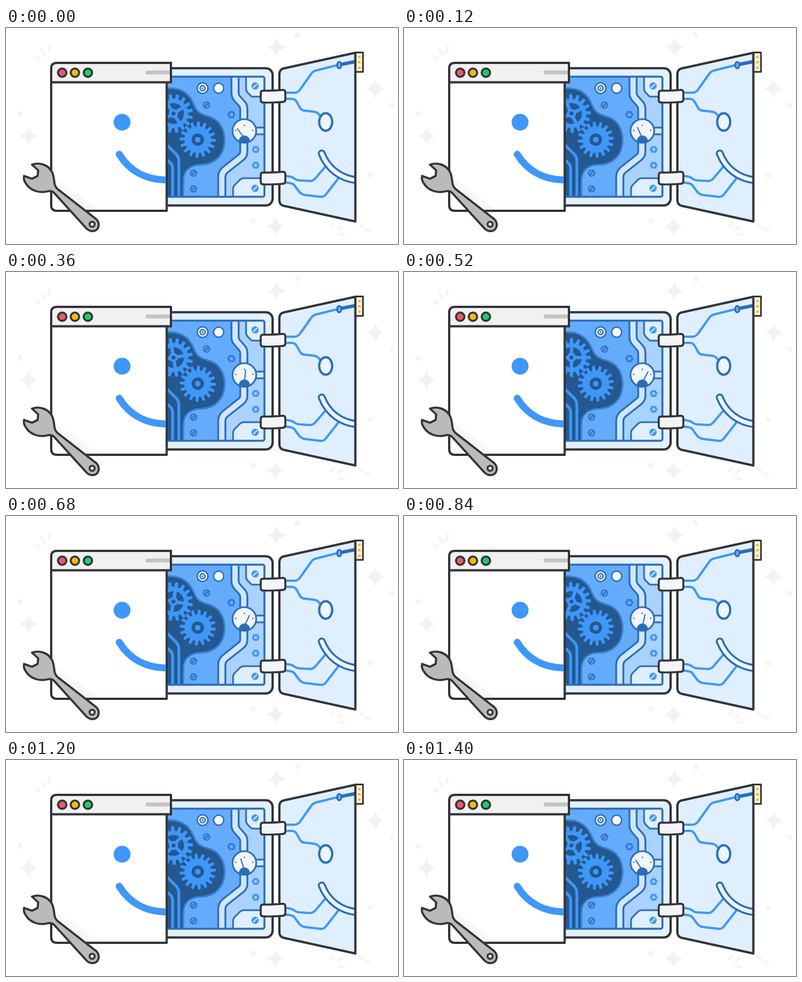
Write an HTML page with a canvas that moves like this. It is 694 by 384 pixels and loops after 1.44 s.

```html
<!DOCTYPE html>
<html lang="en">
<head>
<meta charset="utf-8">
<style>
  html, body { margin: 0; width: 100%; height: 100%; overflow: hidden; background: #fff; }
  canvas { display: block; width: 694px; height: 384px; }
</style>
</head>
<body>
<canvas id="stage" width="694" height="384"></canvas>
<script>
const ctx = document.getElementById('stage').getContext('2d');
const LOOP = 1440;
const INK = '#323438', BLUE = '#3f97f8', LINE = '#2c6dba', DEEP = '#245890';
const PANEL = '#65abfc', PALE = '#a9d2ff', PIPE = '#d0e6ff', ICE = '#dfefff', FAINT = '#f5f5f5';
const TAU = Math.PI * 2;

function paint(path, fill, stroke, width = 4) {
  if (fill) { ctx.fillStyle = fill; ctx.fill(path); }
  if (stroke) {
    ctx.strokeStyle = stroke;
    ctx.lineWidth = width;
    ctx.stroke(path);
  }
}
const draw = (d, fill, stroke, width) => paint(new Path2D(d), fill, stroke, width);

function oval(x, y, rx, ry, fill, stroke, width) {
  const p = new Path2D();
  p.ellipse(x, y, rx, ry, 0, 0, TAU);
  paint(p, fill, stroke, width);
}
const disc = (x, y, r, fill, stroke, width) => oval(x, y, r, r, fill, stroke, width);

function box(x, y, w, h, r, fill, stroke, width) {
  const p = new Path2D();
  p.roundRect(x, y, w, h, r);
  paint(p, fill, stroke, width);
}

function sparkle(x, y, r) {
  const k = r * 0.22;
  draw(`M${x} ${y - r}Q${x + k} ${y - k} ${x + r} ${y}Q${x + k} ${y + k} ${x} ${y + r}` +
       `Q${x - k} ${y + k} ${x - r} ${y}Q${x - k} ${y - k} ${x} ${y - r}Z`, '#f2f2f2');
}

function backdrop() {
  sparkle(479, 34, 16);
  sparkle(654, 108, 16);
  sparkle(40, 192, 16);
  sparkle(477, 353, 16);
  for (const [x, y] of [[516, 12], [25, 153], [683, 137], [645, 262], [437, 343]]) disc(x, y, 5, FAINT);
  draw('M53 52L60 56M63 38L68 46M77 32L76 41M588 44L584 52M600 53L592 57' +
       'M580 348L576 353M594 352L588 357M598 367L590 367M625 348L631 354M637 357L645 361', null, FAINT, 5);
}

function screw(x, y, fill, line, slot) {
  disc(x, y, 5.5, fill, line, 2);
  draw(`M${x - 3} ${y + 3}L${x + 3} ${y - 3}`, null, slot, 2);
}

function nut(x, y, fill, line, hole) {
  draw(`M${x - 6} ${y}l3 -5h6l3 5l-3 5h-6Z`, fill, line, 2);
  disc(x, y, 2.6, hole);
}

function gearBody(outer, root, teeth) {
  const p = new Path2D(), step = TAU / teeth;
  for (let i = 0; i < teeth; i++) {
    for (const [f, r] of [[-0.32, root], [-0.18, outer], [0.18, outer], [0.32, root]]) {
      const a = (i + f) * step;
      p.lineTo(r * Math.cos(a), r * Math.sin(a));
    }
  }
  p.closePath();
  return p;
}
const bigGear = gearBody(34.5, 26, 16);
const smallGear = gearBody(32, 23.5, 16);

function gears(turn) {
  ctx.save();
  ctx.translate(296.5, 152);
  ctx.rotate(turn);
  paint(bigGear, BLUE);
  disc(0, 0, 18.5, DEEP);
  for (let i = 0; i < 4; i++) {
    ctx.rotate(TAU / 4);
    draw('M0 0V-20', null, BLUE, 6);
  }
  disc(0, 0, 8, BLUE);
  disc(0, 0, 3.5, DEEP);
  ctx.restore();

  ctx.save();
  ctx.translate(339.5, 198.5);
  ctx.rotate(0.26 - turn);
  paint(smallGear, BLUE);
  disc(0, 0, 11, DEEP);
  disc(0, 0, 5, BLUE);
  ctx.restore();
}

const SWING = [[0, -36], [200, -17], [560, 34], [840, 13], [1040, -1], [1200, -17], [1440, -36]];
function needleAngle(t) {
  const i = SWING.findIndex(k => k[0] > t);
  const [t0, a0] = SWING[i - 1], [t1, a1] = SWING[i];
  return (a0 + (a1 - a0) * (t - t0) / (t1 - t0)) * Math.PI / 180;
}

function gauge(t) {
  const face = new Path2D();
  face.arc(422, 183, 21, 0, TAU);
  paint(face, '#f1f7ff');
  ctx.save();
  ctx.clip(face);
  for (const [x, y] of [[407, 182], [422, 173], [437, 182]]) disc(x, y, 1.2, LINE);
  ctx.save();
  ctx.translate(422, 196);
  ctx.rotate(needleAngle(t));
  draw('M0 0V-21', null, LINE, 2);
  ctx.restore();
  disc(422, 201, 10, LINE);
  ctx.restore();
  paint(face, null, LINE, 3);
}

function machinery(t) {
  ctx.save();
  const panel = new Path2D();
  panel.rect(270, 87, 187, 213);
  ctx.clip(panel);
  paint(panel, PANEL);

  // lighter wall right of the pipes
  draw('M411 87V118L427 136V228L387 262V300H458V87Z', PALE);

  draw('M270 107H290C313 107 326 119 333 137C338 151 347 154 361 158C379 164 388 182 387 202' +
       'C386 226 370 242 347 243C325 243 314 254 314 272V304H270Z', DEEP, '#3b80cf', 3);
  gears((t - 520) / LOOP * TAU / 4);
  draw('M282 205L301 224Q306 229 306 237V304M282 232L290 239Q295 243 295 250V304', null, BLUE, 5);

  // pipes above and below the gauge
  const upper = 'M405.500 84V116Q405.500 121 409 125L417 134Q421 138 421 144V168';
  const lower = 'M421 198V220Q421 226 416 230L387 253Q382 258 382 265V304';
  for (const d of [upper, lower]) {
    draw(d, null, LINE, 16);
    draw(d, null, PIPE, 9.5);
  }
  draw('M425 84V108Q425 112 428 115L435 122H462V84Z', ICE, LINE, 3);
  draw('M402 304V286Q402 282 405 279L413 271Q416 267 422 267H462V304Z', ICE, LINE, 3);
  draw('M442 177H460V189H442Z', PIPE, LINE, 3);

  for (const [x, y] of [[355, 137], [332, 258], [332, 286]]) screw(x, y, '#559ef3', LINE, LINE);
  for (const [x, y] of [[441, 103], [441, 285]]) screw(x, y, BLUE, BLUE, ICE);
  nut(399, 154, BLUE, LINE, PANEL);
  nut(442, 216, BLUE, BLUE, PALE);
  nut(442, 244, BLUE, BLUE, PALE);

  disc(348, 107, 9.5, '#f6faff', LINE, 2.5);
  disc(348, 107, 4.5, '#dcebff', LINE, 2.5);
  disc(348, 107, 1.5, LINE);
  disc(376.5, 107, 9, '#f6faff', LINE, 2.5);
  gauge(t);
  ctx.restore();
  box(265, 86.5, 192.5, 213.5, 3, null, LINE, 3.5);
}

function safe(t) {
  box(260, 71.5, 212, 244, 12, '#e2f0ff', INK, 4);
  machinery(t);
}

function door() {
  const shape = new Path2D('M491 72L618.5 44V344L491 316Q484 314 484 306V82Q484 74 491 72Z');
  paint(shape, ICE);
  ctx.save();
  ctx.clip(shape);
  draw('M490 115H511Q517 115 521 109L540 82Q544 76 551 75L587 66M490 126H506Q512 126 515 132' +
       'L520 141Q523 147 530 147L546 149Q551 149 556 156', null, BLUE, 4);
  draw('M490 262L502 264Q508 265 511 268Q515 271 522 271L538 272Q544 272 548 267L565 247' +
       'M490 274L504 276Q510 277 513 283L519 291Q523 296 530 297L556 300Q563 301 567 295L588 268', null, BLUE, 4);
  oval(566, 167, 11.5, 15.5, '#edf6ff', LINE, 4);
  const smile = 'M559 223C569 249 591 268 624 271';
  draw(smile, null, LINE, 14);
  draw(smile, null, '#edf6ff', 7);
  draw('M592 65L622 59', null, LINE, 6);
  oval(590, 66, 3.7, 5.8, '#68adfb', LINE, 3);
  ctx.restore();
  paint(shape, null, INK, 4);

  box(619, 43.5, 13, 34.5, 0, '#fff6df', INK, 3);
  for (const y of [51.5, 61, 70.5]) box(623, y - 2, 5, 4, 1, '#fbb51b');
}

function hinge(y) {
  draw(`M455 ${y + 1}Q475 ${y + 1} 490 ${y - 0.5}Q494.500 ${y - 0.5} 494.500 ${y + 4}V${y + 17}` +
       `Q494.500 ${y + 20.5} 490 ${y + 21}Q475 ${y + 22.5} 456 ${y + 22}` +
       `Q451 ${y + 22} 451 ${y + 18}V${y + 5}Q451 ${y + 1} 455 ${y + 1}Z`, '#f3f5f8', INK, 3.5);
}

function browser() {
  draw('M80 96H284.5V325H90Q80 325 80 315Z', '#fff');
  draw('M87 267L158 319L164 324H140L84 280Z', '#f8f8f8');
  draw('M80 96V315Q80 325 90 325H284.5V96', null, INK, 4);
  disc(205.5, 167.5, 15, BLUE);
  ctx.save();
  ctx.beginPath();
  ctx.rect(82, 98, 201, 225);
  ctx.clip();
  draw('M200.500 224.500C219 255 247 270.500 290 270.500', null, BLUE, 12.5);
  ctx.restore();
  draw('M90 62H292V96.500H80V72Q80 62 90 62Z', '#f1f1f1', INK, 4);
  draw('M250.500 79H290', null, '#c3c3c3', 7);
  draw('M292 62V96.500', null, INK, 4);
  disc(99.5, 79.5, 7.5, '#ee5567', INK, 3.5);
  disc(122, 79.5, 7.5, '#fbb70f', INK, 3.5);
  disc(145, 79.5, 7.5, '#22ca69', INK, 3.5);
}

function wrench() {
  draw('M46 243C59 238 74 243 81 255C85 262 85 271 86 277Q87 282 91 286L160 340' +
       'C166 346 165 355 160 359C154 363 147 361 143 357L86 294Q82 289 75 290' +
       'C58 295 42 288 35 276C32 272 31 267 32 263L46 268L56 263L57 253Z', '#bababa', INK, 3.7);
  disc(152.5, 349, 4.5, '#fff', INK, 3.5);
}

function frame(now) {
  const t = now % LOOP;
  ctx.fillStyle = '#fff';
  ctx.fillRect(0, 0, 694, 384);
  ctx.lineCap = ctx.lineJoin = 'round';
  backdrop();
  safe(t);
  door();
  hinge(110.5);
  hinge(256);
  browser();
  wrench();
  requestAnimationFrame(frame);
}
requestAnimationFrame(frame);
</script>
</body>
</html>
```
